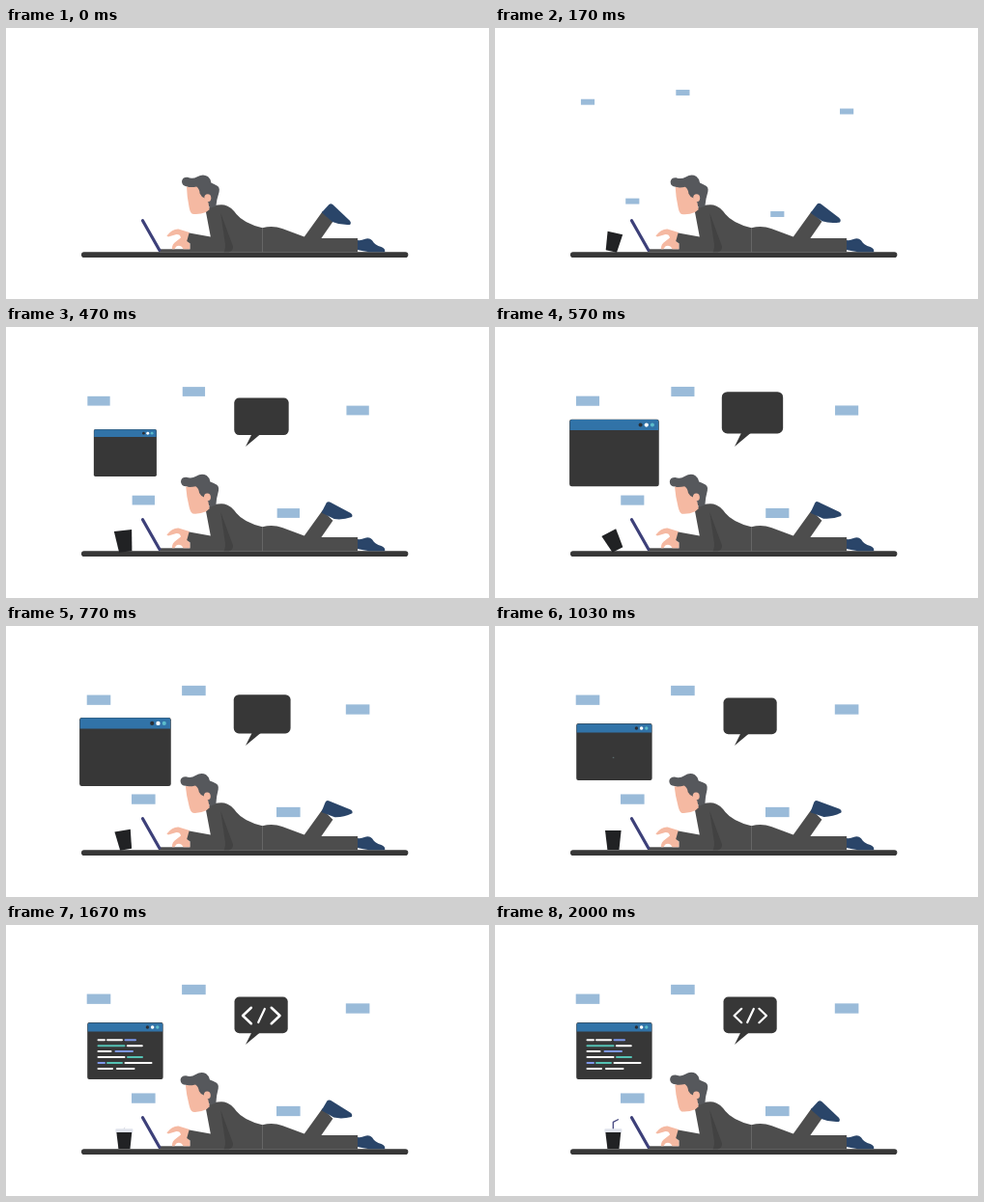
An HTML page that plays this animation: 500x281 px, repeating every 2660 ms.

```html
<!DOCTYPE html>
<html lang="en">
<head>
<meta charset="utf-8">
<title>Coding on the floor</title>
<style>
  html, body { margin: 0; width: 100%; height: 100%; overflow: hidden; background: #fff; }
  svg { display: block; width: 100vw; height: 100vh; }
  .ink { fill: #373737; }
  .suit { fill: #4d4d4d; }
  .skin { fill: #f5b9a2; }
  .hair { fill: #56585c; }
  .shoe { fill: #2a4569; }
  .line { fill: none; stroke-linecap: round; stroke-linejoin: round; }
</style>
</head>
<body>
<svg viewBox="0 0 500 281" preserveAspectRatio="none">
  <g id="papers" fill="#9abbd9"></g>

  <g id="win">
    <rect class="ink" x="84.2" y="101" width="78.4" height="59" rx="2"/>
    <path fill="#3173a8" d="M84.6 110.6V103.2Q84.6 101.4 86.4 101.4H160.4Q162.2 101.4 162.2 103.2V110.6Z"/>
    <circle cx="146.4" cy="106" r="1.7" fill="#2b2f36"/>
    <circle cx="151.6" cy="106" r="1.8" fill="#fff"/>
    <circle cx="156.8" cy="106" r="1.7" fill="#5cbccb"/>
  </g>
  <g id="code" class="line" stroke-width="2"></g>

  <g id="bubble" class="ink">
    <rect x="236.5" y="74.5" width="55.2" height="37.7" rx="5"/>
    <path d="M254.5 111L248 124L263.5 111Z"/>
  </g>
  <g class="line" stroke="#fff" stroke-width="2.2">
    <path id="slash" d="M267.8 87L261.2 101"/>
    <path id="brackets" d="M255.2 86.8L247.6 94L255.2 101.2M273.4 86.8L281 94L273.4 101.2"/>
  </g>

  <rect class="ink" x="78" y="232.3" width="338.3" height="5.7" rx="2.8"/>

  <rect x="158" y="229.3" width="33" height="2.9" fill="#4a4a4a"/>
  <path class="line" d="M141.5 199.7L158.8 230.2" stroke="#3d4079" stroke-width="3.2"/>

  <path class="skin" d="M166.4 215.6Q172 208.3 178.5 208.6L190 212L187.8 221L190.6 224V229.2H183.6Q181 224.6 176.6 226.3L174.3 229.2H172Q171.5 224 176.5 221L181 217.4Q180.4 213.8 176.4 214L168 216.6Z"/>

  <path class="shoe" d="M363.5 220Q368 220.6 371 219Q376 217 379 220.2Q382 225.4 388.5 227Q393 228.8 392.2 232.2H376Q370 231.2 363.5 230Z"/>
  <path class="suit" d="M189.6 212.4L211.8 216.6L207 191Q206.4 188 210 186.4Q217 182.6 226 183.4Q233 185 238.5 193Q246 202.5 265.5 207.3Q276 204.6 286 208L308.8 216.6L327.6 190.2L338.4 200.8L326.4 218H364V232.3H190.6V223.4L187.2 221Z"/>
  <path fill="#424242" d="M222.3 192L235 226.5Q235.2 231.5 230.5 232.3H225.5Q228 228 226.3 220Z"/>
  <path class="line" d="M265.5 207.5V232" stroke="#777" stroke-width=".6"/>
  <path id="foot" class="shoe" d="M326.8 191.2L334.4 183Q336.2 181.3 338.2 183L355.6 199.4Q358 202 356 204Q346 204.6 337.8 201Z"/>

  <g id="head">
    <path class="hair" d="M187.4 164.4Q182 163.8 182 159Q182.6 154.4 188 154.8Q193 157 198 154.2Q204 150.8 209 154Q211.8 156.2 212.4 160.6Q216.2 162.4 217.4 163Q221.8 164.6 220.6 170Q218 178 217.4 184.8L211.6 186.6L204 180L196 168Z"/>
    <path class="skin" d="M187 164.6Q192 165.6 197.2 164.6Q200.4 167 200.6 171.6Q202.4 175.4 205 176L209.5 181L210.6 188.2L207 191Q200 193.8 193 192.8Q190.6 191.6 189.6 186Q187.2 174 187 164.6Z"/>
    <ellipse class="skin" cx="208.8" cy="176.3" rx="3.5" ry="4"/>
  </g>

  <path id="cup" fill="#212224" d="M114 212H130.6L128.5 232H116.4Z"/>
  <path id="straw" class="line" d="M122.3 211.6V204.4L127.4 201.7" stroke="#45477f" stroke-width="1.3"/>
  <rect id="lid" x="113.4" y="211.3" width="18" height="3.8" rx=".8" fill="#e0e3ec"/>
</svg>
<script>
const LOOP = 2660, END = 2000, STEP = 100 / 3;
const NS = 'http://www.w3.org/2000/svg';
const $ = id => document.getElementById(id);

const add = (parent, tag, attrs) => {
  const el = document.createElementNS(NS, tag);
  for (const key in attrs) el.setAttribute(key, attrs[key]);
  return parent.appendChild(el);
};

// code listing: [x1, x2, colour] per dash
const W = '#fff', V = '#7e98ea', G = '#55c2b4';
[
  [[95.5, 102, W], [105, 120, W], [123.5, 134, V]],
  [[95.5, 122.5, G], [125.8, 140.8, W]],
  [[95.5, 108.5, W], [113.5, 131, V]],
  [[95.5, 122.5, W], [126, 141, G]],
  [[95.5, 102, V], [105, 120, G], [123.5, 150.5, W]],
  [[95.5, 110, W], [115, 132.5, W]]
].forEach((row, i) => row.forEach(([a, b, stroke]) =>
  add($('code'), 'path', { d: `M${a} ${119.2 + i * 5.95}H${b}`, stroke })));

const papers = [[96, 76.7], [194.4, 67], [364.1, 86.5], [142.3, 179.6], [292.3, 193]]
  .map(([x, y]) => ({
    x, y,
    el: add($('papers'), 'rect', { x: x - 12.3, y: y - 5.15, width: 24.6, height: 10.3 })
  }));

const linear = p => p;
const out = p => 1 - (1 - p) ** 2;
const smooth = p => (1 - Math.cos(Math.PI * p)) / 2;
const burst = p => 1 - (1 - p) ** 4.7;

// keys: [time, value, easing towards this key]
function track(t, keys) {
  if (t <= keys[0][0]) return keys[0][1];
  for (let i = 1; i < keys.length; i++) {
    const [t0, v0] = keys[i - 1], [t1, v1, ease] = keys[i];
    if (t < t1) return v0 + (v1 - v0) * ease((t - t0) / (t1 - t0));
  }
  return keys[keys.length - 1][1];
}

function pose(el, x, y, scale, angle = 0) {
  el.style.display = scale > 0.001 ? '' : 'none';
  el.setAttribute('transform',
    `translate(${x} ${y}) rotate(${angle}) scale(${scale}) translate(${-x} ${-y})`);
}

function draw(t) {
  const paperSize = track(t, [[0, 0], [1000, 1, burst]]);
  for (const { el, x, y } of papers) pose(el, x, y, paperSize);

  pose($('win'), 123.3, 130.5, track(t, [[334, 0], [667, 1.3, out], [933, 1, smooth]]));
  pose($('code'), 122.7, 136.5, track(t, [[1000, 0], [1333, 1, smooth]]));
  pose($('bubble'), 248, 124, track(t, [[334, 0], [533, 1.15, out], [967, 1, smooth]]));
  pose($('slash'), 264.5, 94, track(t, [[1200, 0], [1400, 1.2, out], [1567, 1, smooth]]));
  pose($('brackets'), 264.4, 94, track(t, [[1350, 0], [1667, 1.15, out], [1833, 1, smooth]]));

  pose($('cup'), 122.4, 222,
    track(t, [[0, 0], [333, 1.28, out], [567, 1, smooth]]),
    track(t, [[0, 0], [333, 25, smooth], [567, -27, smooth], [905, 0, smooth]]));
  $('lid').setAttribute('transform',
    `translate(0 ${track(t, [[1167, -16], [1533, 0, smooth]])})`);
  $('lid').style.opacity = track(t, [[1167, 0], [1400, 1, linear]]);
  pose($('straw'), 122.3, 211.6, track(t, [[1600, 0], [1867, 1, smooth]]));

  pose($('foot'), 331.5, 193, 1, -23 * Math.sin(Math.PI * t / 2000));
  pose($('head'), 211, 185, 1, -4 * Math.sin(Math.PI * t / 2400));
}

const start = performance.now();
function tick() {
  const t = (performance.now() - start) % LOOP;
  draw(Math.min(END, Math.floor((t + 3.4) / STEP) * STEP));
  requestAnimationFrame(tick);
}
tick();
</script>
</body>
</html>
```
